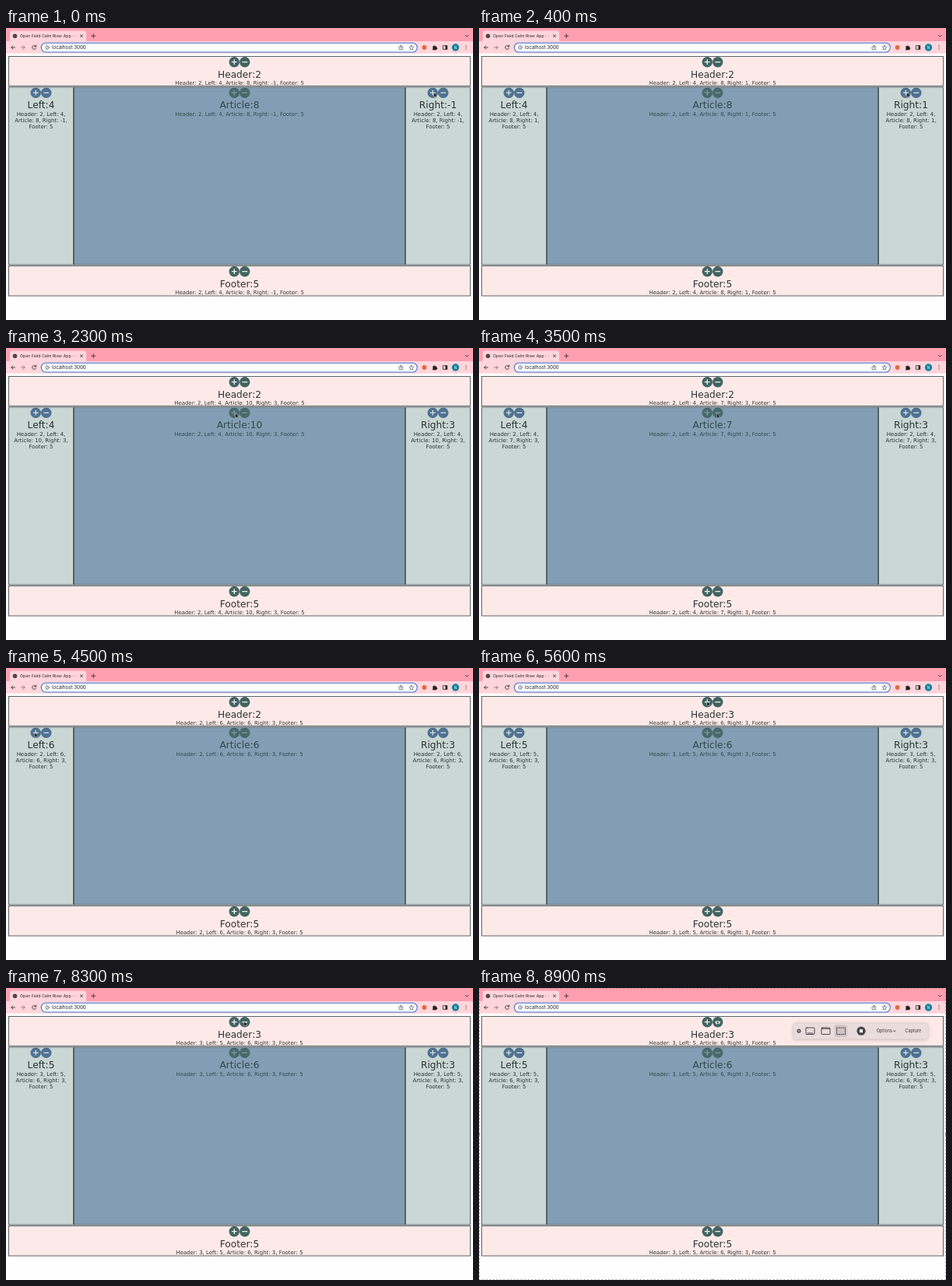
Recreate the animation shown at these times as an HTML page. Size 600x375 px, loop 9000 ms.

```html
<!DOCTYPE html>
<html lang="en">
<head>
<meta charset="utf-8">
<title>Counter layout</title>
<style>
  html, body { margin: 0; width: 100%; height: 100%; overflow: hidden; background: #fefefe; }
  svg { display: block; width: 600px; height: 375px; }
  text { font-family: Inter, sans-serif; }
  .panel text { font-family: "DejaVu Sans", sans-serif; font-size: 6.95px; text-anchor: middle; }
  .panel text.count { font-size: 12.2px; }
  .line { fill: none; stroke: #3d3438; stroke-width: .9; stroke-linecap: round; stroke-linejoin: round; }
</style>
</head>
<body>
<svg id="stage" viewBox="0 0 600 375">
  <defs>
    <linearGradient id="fade" x1="0" x2="1">
      <stop offset="0" stop-color="#ffd5db" stop-opacity="0"/>
      <stop offset="1" stop-color="#ffd5db"/>
    </linearGradient>
    <filter id="shadow" x="-10%" y="-40%" width="120%" height="200%">
      <feDropShadow dx="0" dy="1" stdDeviation="2" flood-opacity=".2"/>
    </filter>
  </defs>

  <!-- browser window -->
  <rect width="600" height="17.5" fill="#ff9fb0"/>
  <rect y="17" width="600" height="15.7" fill="#ffd5db"/>
  <path d="M2 17.5q3 0 3-3V6.500q0-3 3-3H100q3 0 3 3v8q0 3 3 3z" fill="#ffd5db"/>
  <circle cx="11.500" cy="10.200" r="2.800" fill="#4c4648"/>
  <text x="18" y="12.100" font-size="5.200" fill="#222">Open Field Calm River App - MIT</text>
  <rect x="84" y="5" width="7" height="10" fill="url(#fade)"/>
  <rect x="91" y="5" width="12" height="10" fill="#ffd5db"/>
  <path class="line" d="M95.500 8.700l3 3m0-3l-3 3M109.800 10.200h5m-2.500-2.500v5M590.200 9.300l2 2 2-2"/>
  <path class="line" d="M11.500 25H6.800m2.200-2.200L6.800 25 9 27.200M38.300 23.600a2.500 2.500 0 1 0 .2 2.200M38.600 22v1.900h-1.900"/>
  <path class="line" style="stroke:#8d7378" d="M19.500 25h4.700M22 22.800l2.200 2.200-2.200 2.200"/>
  <rect x="45.300" y="19.200" width="483" height="11.800" rx="5.900" fill="#fff" stroke="#3c73cf" stroke-width="1.100"/>
  <g class="line" style="stroke:#555;stroke-width:.7">
    <circle cx="53" cy="25" r="2.300"/><path d="M53 24.800v1.200m0-2.300v.1"/>
    <path d="M506 24h-1v3.700h4.800V24h-1M507.400 26v-3.900m-1.200 1.200l1.200-1.200 1.200 1.200"/>
    <path d="M521 22.100l.9 1.900 2.100.3-1.500 1.500.4 2.100-1.900-1-1.900 1 .4-2.100-1.500-1.500 2.100-.3z"/>
  </g>
  <text x="59" y="27.200" font-size="6.200" fill="#222">localhost:3000</text>
  <circle cx="537.500" cy="25" r="2.900" fill="#e4663f"/>
  <path d="M548 23.500h1.500a1.100 1.100 0 0 1 2.200 0h1.500v1.500a1.100 1.100 0 0 1 0 2.200v1H548v-1.500a1 1 0 0 0 0-1.900z" fill="#222"/>
  <rect class="line" x="561.800" y="22.600" width="5" height="4.800"/>
  <path d="M564.500 22.600h2.300v4.800h-2.300z" fill="#222"/>
  <circle cx="577.500" cy="25" r="4.700" fill="#167f9e"/>
  <text x="577.500" y="26.700" font-size="4.500" fill="#fff" text-anchor="middle">N</text>
  <path class="line" style="stroke-width:1.200" d="M591 22.900v.01M591 25v.01M591 27.100v.01"/>

  <g id="panels"></g>
  <path id="cursor" d="M0 0v6l1.400-1.200.9 2 .9-.4-.9-2h1.900z" fill="#111" stroke="#fff" stroke-width=".35"/>

  <!-- screen capture controls -->
  <g id="capture">
    <rect x=".5" y=".5" width="599" height="374" fill="none" stroke="#8a8486" stroke-opacity=".6" stroke-dasharray="2.500 2"/>
    <g fill="#999"><circle cx="0" cy="187.500" r="1.500"/><circle cx="600" cy="187.500" r="1.500"/><circle cx="300" cy="0" r="1.500"/><circle cx="300" cy="375" r="1.500"/></g>
    <rect x="304" y="42.500" width="5.400" height="3.800" rx="1" fill="#e8e8e8"/>
    <circle cx="306.700" cy="44.400" r="1.100" fill="#444"/>
    <rect x="403.800" y="44.800" width="173.200" height="20.800" rx="4" fill="#e9dcdd" stroke="#d3c5c7" stroke-width=".5" filter="url(#shadow)"/>
    <rect x="457" y="47.500" width="16" height="15.400" rx="2" fill="#cfc3c5"/>
    <circle cx="411" cy="55.200" r="2.600" fill="#5c5456"/>
    <path d="M410 54.200l2 2m0-2l-2 2" stroke="#e9dcdd" stroke-width=".7"/>
    <g class="line">
      <rect x="420" y="51" width="11" height="8.500" rx="1"/><path d="M422 58h7"/>
      <rect x="440" y="51" width="11" height="8.500" rx="1"/><path d="M440.500 52.300h10"/>
      <rect x="459.700" y="51" width="10.800" height="8.500" stroke-dasharray="1.100 1.500"/>
      <path d="M532.300 54.700l1.400 1.400 1.400-1.400"/>
    </g>
    <circle cx="491" cy="55.200" r="5.600" fill="#4a4345"/>
    <rect x="489" y="53.200" width="4" height="4" fill="#fff"/>
    <g font-size="5.500" fill="#40383a"><text x="510.800" y="57.200">Options</text><text x="547.600" y="57.200">Capture</text></g>
  </g>
</svg>
<script>
const LOOP = 9000, STEP = 100, CAPTURE_AT = 8600;
const $ = id => document.getElementById(id);

const pink = { fill: "#fde9e8", button: "#406461", icon: "#f7eeee", ink: "#2c3636" };
const sage = { fill: "#cbd7d4", button: "#4f7191", icon: "#d7e1e2", ink: "#293433" };
const blue = { fill: "#839eb4", button: "#48696a", icon: "#7f9ba0", ink: "#33484a" };

// start value and the times of each click
const panels = [
  { name: "Header", x: 3.5, y: 36.5, w: 593, h: 38, look: pink, start: 2, up: [5600, 5800, 6000, 6200], down: [6800, 7000, 7300] },
  { name: "Left", x: 3.5, y: 76, w: 83, h: 228, look: sage, narrow: true, start: 4, up: [4300, 4500], down: [5000] },
  { name: "Article", x: 87.5, y: 76, w: 425, h: 228, look: blue, start: 8, up: [1700, 2000], down: [2700, 3000, 3300, 3700] },
  { name: "Right", x: 513.5, y: 76, w: 83, h: 228, look: sage, narrow: true, start: -1, up: [100, 300, 500, 700], down: [] },
  { name: "Footer", x: 3.5, y: 305.5, w: 593, h: 38.5, look: pink, start: 5, up: [], down: [] }
];

// time, x, y
const path = [
  [0, 550, 83], [800, 550, 83], [1200, 384, 75.5], [1500, 295, 84], [2300, 295, 84],
  [2600, 305.5, 84], [3800, 305.5, 84], [4200, 37, 83], [4600, 37, 83], [4800, 51, 83],
  [5200, 51, 83], [5600, 293, 43], [6300, 293, 43], [6500, 306, 43], [LOOP, 306, 43]
];

function panelMarkup({ x, y, w, h, look, narrow }) {
  const cx = x + w / 2, cy = y + 7.2;
  const button = (bx, icon) => `<circle cx="${bx}" cy="${cy}" r="6.7" fill="${look.button}"/>
    <path d="M${bx - 3.4} ${cy}h6.8${icon}" stroke="${look.icon}" stroke-width="1.3" fill="none"/>`;
  const lines = (narrow ? [0, 1, 2] : [0]).map(i => `<text x="${cx}" y="${cy + 29.3 + i * 8.15}"></text>`);
  return `<g class="panel" fill="${look.ink}">
    <rect x="${x}" y="${y}" width="${w}" height="${h}" fill="${look.fill}" stroke="#4b5558" stroke-width=".9"/>
    ${button(cx - 6.75, "m-3.4-3.4v6.8")}${button(cx + 6.75, "")}
    <text class="count" x="${cx}" y="${cy + 20.1}"></text>${lines.join("")}</g>`;
}

$("panels").innerHTML = panels.map(panelMarkup).join("");
panels.forEach((p, i) => p.texts = $("panels").children[i].querySelectorAll("text"));

function cursorAt(t) {
  const i = path.findIndex(key => key[0] > t);
  const [t0, x0, y0] = path[i - 1], [t1, x1, y1] = path[i];
  const k = (t - t0) / (t1 - t0), e = k * k * (3 - 2 * k);
  return [x0 + (x1 - x0) * e, y0 + (y1 - y0) * e];
}

function draw(now) {
  const t = Math.floor(now % LOOP / STEP) * STEP;
  const passed = times => times.filter(time => time <= t).length;
  const counts = panels.map(p => p.start + passed(p.up) - passed(p.down));
  const parts = panels.map((p, i) => `${p.name}: ${counts[i]}`);
  const wrapped = [parts.slice(0, 2).join(", ") + ",", parts.slice(2, 4).join(", ") + ",", parts[4]];
  panels.forEach((p, i) => {
    const [title, ...lines] = p.texts;
    title.textContent = `${p.name}:${counts[i]}`;
    lines.forEach((line, n) => line.textContent = p.narrow ? wrapped[n] : parts.join(", "));
  });
  const capturing = t >= CAPTURE_AT;
  $("capture").style.display = capturing ? "" : "none";
  $("cursor").style.display = capturing ? "none" : "";
  $("cursor").setAttribute("transform", `translate(${cursorAt(t)})`);
}

const begin = performance.now();
function tick() {
  draw(performance.now() - begin);
  requestAnimationFrame(tick);
}
tick();
</script>
</body>
</html>
```
